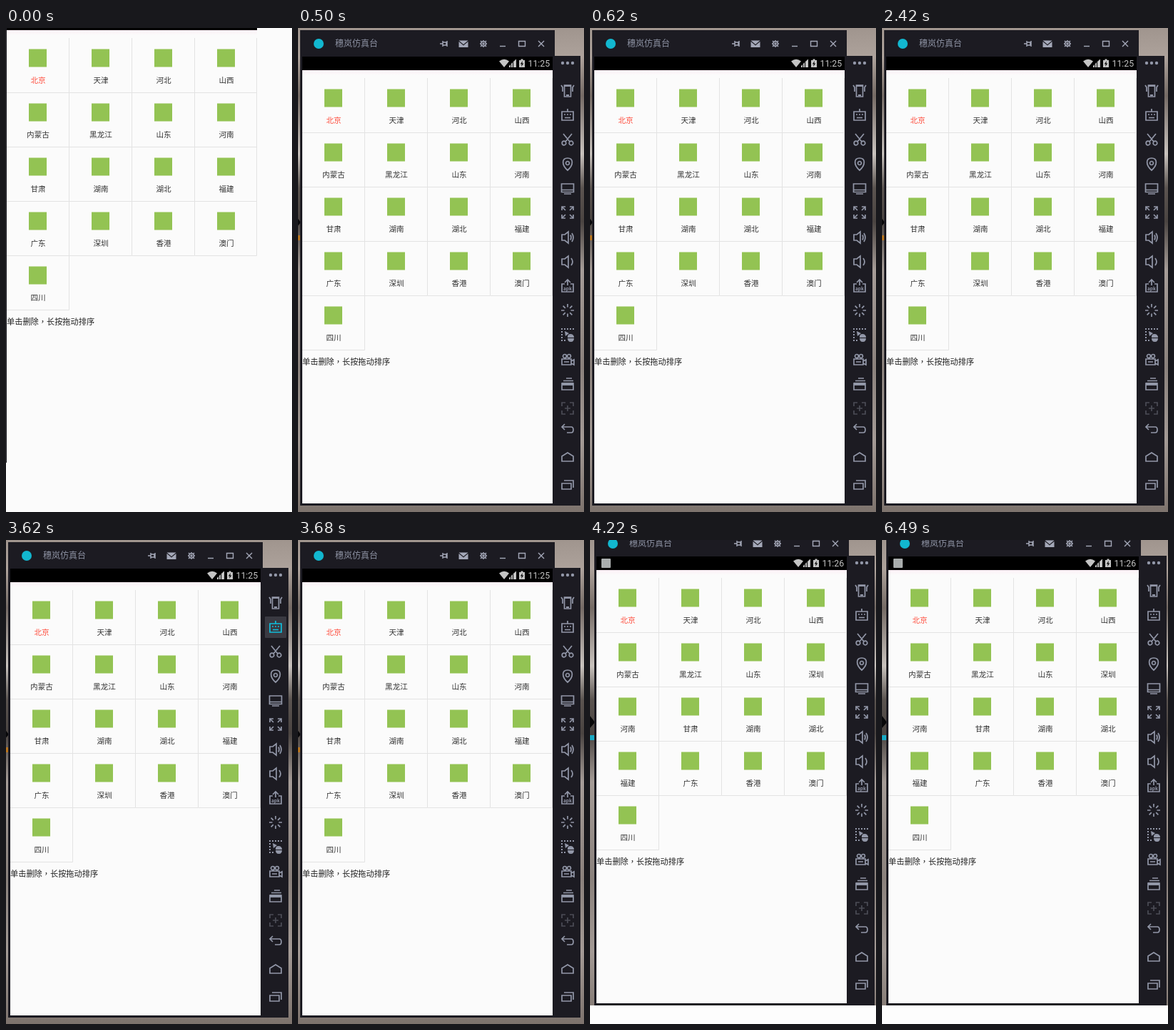
Write an HTML page that moves like this. It is 401 by 677 pixels and loops after 8 s.

```html
<!DOCTYPE html>
<html lang="zh-CN">
<head>
<meta charset="utf-8">
<style>
html, body { margin: 0; width: 100%; height: 100%; overflow: hidden; background: #fbfbfb; }
svg { display: block; width: 401px; height: 677px; }
text { font-family: "Noto Sans CJK SC", "Noto Sans CJK", "Noto Sans", sans-serif; }
.centred { font-family: "Noto Sans CJK TC", "Noto Sans CJK", sans-serif; }
.label { font-size: 10.6px; text-anchor: middle; fill: #333; }
.icon { fill: none; stroke: currentColor; stroke-width: 1.7; color: #9297a8; }
.icon.dim { color: #4b4c56; }
.icon .solid { fill: currentColor; stroke: none; }
.icon.hot { color: #10bfdc; }
.caption .icon { color: #a4a8b8; stroke-width: 1.4; }
</style>
</head>
<body>
<svg viewBox="0 0 401 677">
  <defs>
    <linearGradient id="rock" x2="0" y2="1">
      <stop offset="0" stop-color="#a0958e"/>
      <stop offset=".06" stop-color="#ada29b"/>
      <stop offset=".14" stop-color="#756b65"/>
      <stop offset=".26" stop-color="#c8c2bd"/>
      <stop offset=".33" stop-color="#5b5450"/>
      <stop offset=".4" stop-color="#4a4441"/>
      <stop offset=".5" stop-color="#a59c97"/>
      <stop offset=".7" stop-color="#8a817c"/>
      <stop offset=".85" stop-color="#a39a95"/>
      <stop offset="1" stop-color="#7d736d"/>
    </linearGradient>
    <linearGradient id="blush" x2="0" y2="1">
      <stop offset="0" stop-color="#fcf0f6"/>
      <stop offset="1" stop-color="#fbfbfb"/>
    </linearGradient>
    <clipPath id="crop"><rect x="5" y="56" width="352" height="608"/></clipPath>
  </defs>
  <rect width="401" height="677" fill="#fbfbfb"/>
  <rect id="desktop" width="401" height="677" fill="url(#rock)"/>
  <g id="window">
    <g id="marks">
      <path d="M-3 263L4 272-3 280z" fill="#08080a"/>
      <rect id="chip" x="-3" y="290" width="6" height="7"/>
    </g>
    <path d="M3 3H360V39H396V668H3z" fill="#1c1b22"/>
    <g class="caption">
      <circle cx="29" cy="22" r="7" fill="#12b7cf"/>
      <text x="52" y="26" font-size="12" fill="#8d92a3">穗岚仿真台</text>
      <g id="caption"></g>
    </g>
    <rect x="6" y="40" width="351" height="625" fill="#fbfbfb"/>
    <rect x="6" y="40" width="351" height="19" fill="#000"/>
    <rect x="6" y="59" width="351" height="7" fill="url(#blush)"/>
    <rect id="notice" x="13" y="43" width="13" height="13" rx="1" fill="#a9adad"/>
    <g fill="#c4c4c4">
      <path d="M282 46.500Q289 41 296 46.500L289 55z"/>
      <path d="M296 55V53L298 51V55zM299 55V50L301 48V55zM302 55V47L306 43.500V55z"/>
      <path d="M310 45H312.500V43.500H315.500V45H318V55H310z"/>
      <path d="M315 46L311.800 50.500H313.800L313 54 316.300 49.500H314.200z" fill="#000"/>
      <text id="clock" x="322.500" y="54.300" font-size="12.300" style="font-family:Roboto,sans-serif"></text>
    </g>
    <g id="grid"></g>
    <text x="6" y="471" font-size="11.200" fill="#222">单击删除<tspan class="centred" lang="zh-TW">，</tspan>长按拖动排序</text>
    <rect id="hover" x="363" width="30" height="30" rx="1" fill="#3a3a42"/>
    <g id="tools"></g>
  </g>
  <rect id="floor" y="651" width="401" height="26" fill="#fdfdfd"/>
</svg>
<script>
const $ = id => document.getElementById(id);

function add(parent, tag, attrs, text) {
  const node = document.createElementNS("http://www.w3.org/2000/svg", tag);
  for (const key in attrs) node.setAttribute(key, attrs[key]);
  if (text) node.textContent = text;
  return parent.appendChild(node);
}

// Each icon is drawn around its own centre: outline, then optional solid part.
function icon(parent, x, y, line, solid, dim) {
  const g = add(parent, "g", { class: dim ? "icon dim" : "icon", transform: `translate(${x} ${y})` });
  add(g, "path", { d: line });
  if (solid) add(g, "path", { d: solid, class: "solid" });
  return g;
}

const ring = (x, y, r) => `M${x - r} ${y}a${r} ${r} 0 1 0 ${2 * r} 0a${r} ${r} 0 1 0 ${-2 * r} 0z`;
const corners = "M-8-3V-8H-3M3-8H8V-3M8 3V8H3M-3 8H-8V3";
const speaker = "M-8-4H-4L1-8V8L-4 4H-8z";
const rays = Array.from({ length: 8 }, (_, i) => {
  const a = i * Math.PI / 4, p = r => `${Math.cos(a) * r} ${Math.sin(a) * r}`;
  return `M${p(4.5)}L${p(9)}`;
}).join("");
const dots = Array.from({ length: 5 }, (_, i) => {
  const at = -9 + i * 4;
  return `M${at}-9h2v2h-2zM-9 ${at}h2v2h-2z` + (i < 2 ? `M${at} 7h2v2h-2z` : "");
}).join("");

const tools = [
  [49, "", ring(-7, 0, 2.2) + ring(0, 0, 2.2) + ring(7, 0, 2.2)],
  [88, "M-4.500-8H4.500V8H-4.500zM-9-8L-7-5V1M9-8L7-5V1", "M-2 5H2V7H-2zM-4-8H4V-6H-4z"],
  [122, "M-8-5H8V7H-8zM0-5V-9M-4 3.500H4M-5-1H-3M-1-1H1M3-1H5"],
  [156, ring(-5, 5, 2.8) + ring(5, 5, 2.8) + "M-3 3L6-8M3 3L-6-8"],
  [190, "M0 9C-9 1-8-8 0-8S9 1 0 9z" + ring(0, -1, 2.5)],
  [225, "M-8.500-7H8.500V4.500H-8.500zM-8 1.500H8M-5 7H5"],
  [258, corners + "M-7-7L-3-3M7-7L3-3M7 7L3 3M-7 7L-3 3"],
  [293, speaker + "M4-3.500Q6 0 4 3.500M6-6Q10 0 6 6"],
  [327, speaker + "M5-5Q9 0 5 5"],
  [361, "M-4-3H-8V8H8V-3H4M0-1V-8M-4-5L0-9 4-5"],
  [395, rays],
  [429, "", dots + "M-4-5L2-2-3 2zM0 3Q0-1 4-1T9 3V4H0zM0 5H9Q9 10 4.500 10T0 5z"],
  [464, ring(-4, -5, 2.5) + ring(2, -5, 2.5) + "M-8-1H5V7H-8zM5 2L9 0V7L5 5M-5 3H2"],
  [498, "M-8-1H8V8H-8zM-6-4.500H8M-2-8H6", "M-8-2H8V2H-8z"],
  [532, corners + "M-4 0H4M0-4V4", "", true],
  [561, "M-4-7L-8-3-4 1M-8-3H5Q8-3 8 1T5 5H-1"],
  [600, "M-8 6V-1L0-6 8-1V6z"],
  [639, "M-8-2H5V6H-8zM-5-6H8V4"]
].map(([y, line, solid, dim]) => icon($("tools"), 378, y, line, solid, dim));
add(tools[9], "text", { y: 6, class: "solid", "font-size": 6.5, "font-weight": 700, "text-anchor": "middle" }, "apk");

[
  [205, "M-6 0H-2M-2-4V4M-2-2H3V2H-2M4-4V4"],
  [232, "", "M-6.500-4.500H6.500L0 1zM-6.500-3L0 2.500 6.500-3V5H-6.500z"],
  [260, ring(0, 0, 3.3) + ring(0, 0, 1) + "M0-5V-3M0 3V5M-5 0H-3M3 0H5M-4-4L-2-2M4 4L2 2M4-4L2-2M-4 4L-2 2"],
  [287, "M-4 3.500H4"],
  [314, "M-4.500-3.500H4.500V3.500H-4.500z"],
  [341, "M-4-4L4 4M4-4L-4 4"]
].forEach(([x, line, solid]) => icon($("caption"), x, 22, line, solid));

const before = "北京 天津 河北 山西 内蒙古 黑龙江 山东 河南 甘肃 湖南 湖北 福建 广东 深圳 香港 澳门 四川".split(" ");
// The drag moves one city up to the eighth place.
const after = before.filter(city => city !== "深圳");
after.splice(7, 0, "深圳");

const labels = before.map((city, i) => {
  const x = 6 + i % 4 * 88, y = 70 + (i >> 2) * 76;
  const right = Math.min(x + 87.5, 356.5);
  add($("grid"), "path", { d: `M${right} ${y}V${y + 76.5}H${x}`, fill: "none", stroke: "#e3e3e3" });
  add($("grid"), "rect", { x: x + 31, y: y + 15.5, width: 25, height: 25, fill: "#93c353" });
  const label = add($("grid"), "text", { class: "label", x: x + 44, y: y + 62.5 });
  if (!i) label.style.fill = "#ff4a3a";
  return label;
});

// [start ms, view, index of the hovered tool]
const steps = [[0, "page"], [500, "window"], [560, "window", 1], [620, "window"],
  [3620, "window", 2], [3680, "window"], [4220, "moved"]];
const offsets = { page: "-5 -56", window: "0 0", moved: "3 -17" };
const show = (id, on) => $(id).style.display = on ? "" : "none";

function render([, view, hot]) {
  const page = view === "page", moved = view === "moved";
  $("window").setAttribute("transform", `translate(${offsets[view]})`);
  if (page) $("window").setAttribute("clip-path", "url(#crop)");
  else $("window").removeAttribute("clip-path");
  show("desktop", !page);
  show("marks", !page);
  show("floor", moved);
  show("notice", moved);
  show("hover", hot);
  $("chip").setAttribute("fill", moved ? "#18a9c4" : "#b8751f");
  $("clock").textContent = moved ? "11:26" : "11:25";
  if (hot) $("hover").setAttribute("y", 39 + hot * 34);
  tools.forEach((tool, i) => tool.classList.toggle("hot", i === hot));
  labels.forEach((label, i) => label.textContent = (moved ? after : before)[i]);
}

const origin = performance.now();
let current;
function tick() {
  const time = (performance.now() - origin) % 8000;
  const step = steps.findLast(([start]) => start <= time);
  if (step !== current) render(current = step);
  requestAnimationFrame(tick);
}
tick();
</script>
</body>
</html>
```
